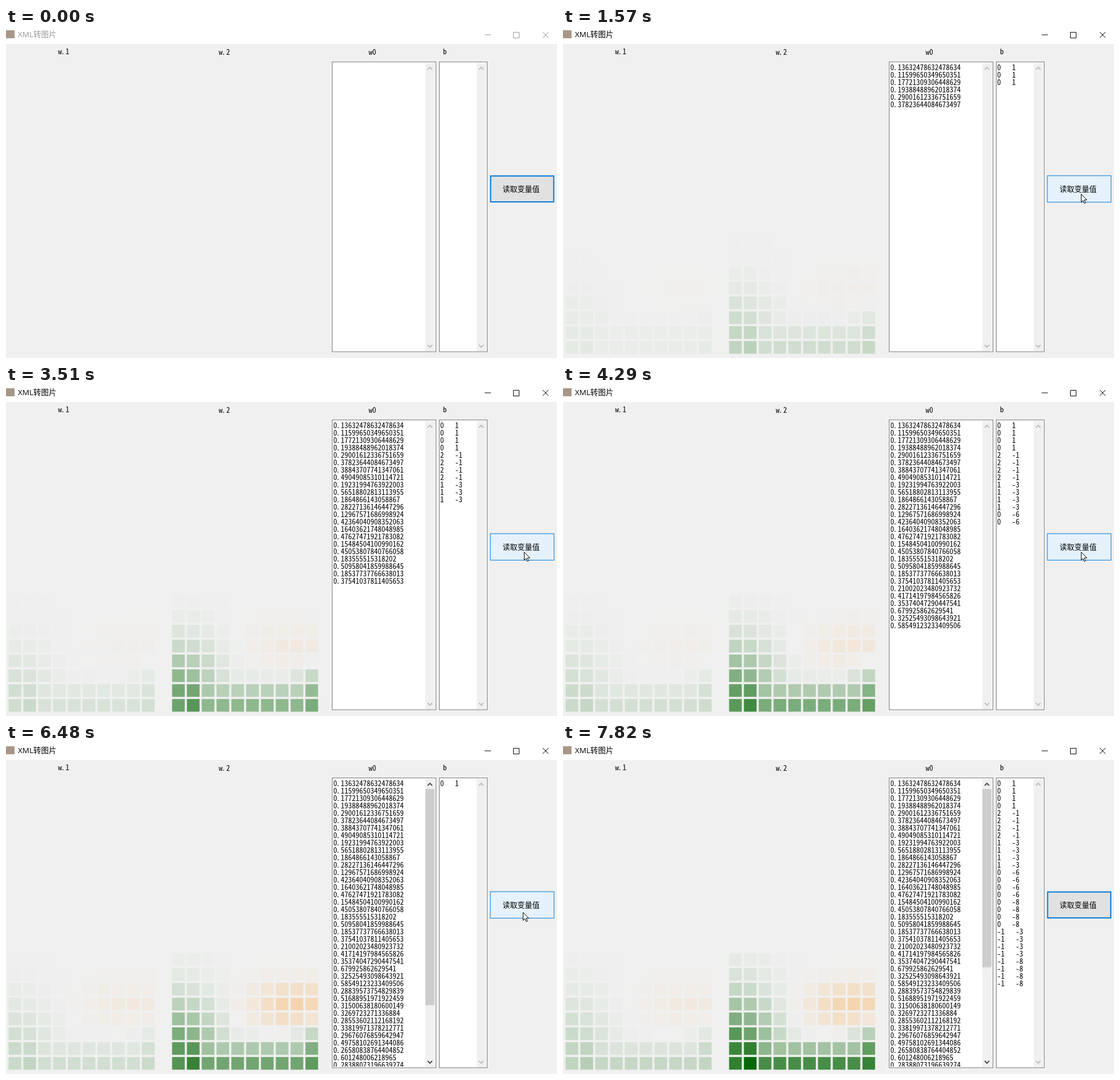
Recreate the animation shown at these times as an HTML page. Size 967x579 px, loop 8 s.

```html
<!DOCTYPE html>
<html lang="zh-CN">
<head>
<meta charset="utf-8">
<title>XML转图片</title>
<style>
html, body { margin: 0; width: 100%; height: 100%; overflow: hidden; background: #f0f0f0; }
svg { display: block; width: 967px; height: 579px; }
text { font: 13px "Noto Sans Mono CJK SC", "Noto Sans CJK SC", "Noto Sans CJK", "Liberation Mono", monospace; white-space: pre; }
#title { font: 13.5px "Open Sans", "Noto Sans CJK SC", "Noto Sans CJK", sans-serif; }
.line { fill: none; }
</style>
</head>
<body>
<svg id="stage" viewBox="0 0 967 579" xmlns="http://www.w3.org/2000/svg">
  <rect width="967" height="579" fill="#f0f0f0"/>
  <rect width="967" height="28" fill="#fff"/>
  <rect x="0" y="4" width="15" height="14" fill="#a89788"/>
  <text id="title" x="21" y="16">XML转图片</text>
  <path id="controls" class="line" d="M840 12h11M890.5 7.5h10v10h-10zM942 7l10 10m0-10l-10 10"/>
  <g id="cells"></g>
  <g id="labels"></g>
  <g id="boxes"></g>
  <clipPath id="clip"><rect x="573" y="60" width="270" height="506"/></clipPath>
  <g id="rows" clip-path="url(#clip)"></g>
  <rect id="button"/>
  <text x="904" y="287" text-anchor="middle">读取变量值</text>
  <path id="cursor" d="M.5.5v14l3.2-3 2.3 5.2 2.2-1-2.3-5h4.5z" fill="#fff" stroke="#000"/>
</svg>
<script>
const LOOP = 8000, COLS = 10, ROWS = 8, STEPS = 28;
const $ = id => document.getElementById(id);

function set(el, attrs) {
  for (const k in attrs) el.setAttribute(k, attrs[k]);
}
function add(parent, tag, attrs, text) {
  const el = document.createElementNS("http://www.w3.org/2000/svg", tag);
  set(el, attrs);
  if (text !== undefined) el.textContent = text;
  return parent.appendChild(el);
}
function show(el, on) { el.style.display = on ? "" : "none"; }

const mix = (a, b, p) => a + (b - a) * p;
const bell = (d, width) => Math.exp(-((d / width) ** 2));

// Piecewise linear curve through [x, y] points.
function curve(points, x) {
  const i = points.findIndex(p => x <= p[0]);
  if (i < 0) return points[points.length - 1][1];
  if (i === 0) return points[0][1];
  const [x0, y0] = points[i - 1], [x1, y1] = points[i];
  return mix(y0, y1, (x - x0) / (x1 - x0));
}

// Green comes from the left, bottom and right edges; orange from a patch at the right.
const learning = [[7, 0], [11, .25], [18, .75], [23, .55], [27, 1]];
function weight(r, c, step) {
  const p = curve(learning, step);
  const left = mix(.46, .8, p) * bell(r, mix(3.4, 4.1, p)) * bell(c, 2.6);
  const ridge = mix(.52, .98, p) * bell(r, 2.2) * bell(c - 1, .7);
  const bottom = mix(.31, .7, p) * bell(r, mix(1.4, 1.15, p));
  const right = mix(.4, .77, p) * bell(r, 2) * bell(9 - c, 1.2);
  const late = Math.min(1, Math.max(0, (step - 7) / 16));
  const orange = mix(.06, .28, late * late) * bell(c - 8, 3) * bell(r - 3.9, 1.5);
  return Math.min(1, step / 7) * (Math.max(left, ridge, bottom, right) - orange);
}

// Text shown in the two boxes
const values = `13632478632478634 11599650349650351 17721309306448629 19388488962018374
29001612336751659 37823644084673497 38843707741347061 49049085310114721
19231994763922003 56518802813113955 1864866143058867 28227136146447296
12967571686998924 42364040908352063 16403621748048985 47627471921783082
15484504100990162 45053807840766058 183555515318202 50958041859988645
18537737766638013 37541037811405653 21002023480923732 41714197984565826
35374047290447541 679925862629541 32525493098643921 58549123233409506
28839573754829839 51688951971922459 31500638180600149 3269723271336884
28553602112168192 33819971378212771 29676076859642947 49758102691344086
26580838764404852 601248006218965 28388073196639274`.split(/\s+/).map(d => "0." + d);
const biases = ["0   1", "2   -1", "1   -3", "0   -6", "0   -8", "-1   -3", "-1   -8"];

const dot = "0 -1.5 1.5";
add($("labels"), "text", { x: 91.5, y: 46, dx: dot }, "w.1");
add($("labels"), "text", { x: 373.5, y: 47, dx: dot }, "w.2");
add($("labels"), "text", { x: 636.5, y: 47 }, "w0");
add($("labels"), "text", { x: 767, y: 46 }, "b");

function textBox(x, w) {
  const g = $("boxes"), gutter = x + w - 19;
  add(g, "rect", { x: x + .5, y: 59.5, width: w - 1, height: 508.5, fill: "#fff", stroke: "#7a7a7a" });
  add(g, "rect", { x: gutter, y: 61, width: 17, height: 506, fill: "#f0f0f0" });
  const thumb = add(g, "rect", { x: gutter, y: 79, width: 16, height: 0, fill: "#cdcdcd" });
  const arrows = add(g, "path", {
    class: "line", stroke: "#bfbfbf", "stroke-width": 2,
    d: `M${gutter + 4} 73l4-4 4 4M${gutter + 4} 556l4 4 4-4`
  });
  return { thumb, arrows };
}
const valueBox = textBox(572, 183);
textBox(760, 85);

const addRow = (x, i, text, attrs) => add($("rows"), "text", { x, y: 73.7 + 13 * i, ...attrs }, text);
const valueRows = values.map((s, i) => addRow(574.5, i, s, { dx: dot }));
const biasRows = Array.from({ length: STEPS }, (_, i) => addRow(762, i, biases[i >> 2]));

// The first panel holds the same pattern as the second, only fainter.
const cells = [];
for (const [x, scale] of [[4.5, .25], [291.5, 1]])
  for (let r = 0; r < ROWS; r++)
    for (let c = 0; c < COLS; c++) {
      const el = add($("cells"), "rect", { x: x + 26 * c, y: 549.2 - 26 * r, width: 22.2, height: 22.2 });
      cells.push({ el, scale, r, c });
    }

// Training steps come at a steady beat with a short pause after some of them.
const pauses = [7, 13, 18, 23];
const stepTime = n => 1097 + 232 * (n - 1) + 88 * pauses.filter(p => n > p).length;
function stepAt(t) {
  let n = 0;
  while (n < STEPS && t >= stepTime(n + 1)) n++;
  return n;
}

let lastStep = -1;
function drawStep(step) {
  if (step === lastStep) return;
  lastStep = step;
  for (const { el, scale, r, c } of cells) {
    const v = scale * weight(r, c, step);
    set(el, { fill: v < 0 ? "#ff8c00" : "#006400", "fill-opacity": Math.abs(v).toFixed(3) });
  }
  valueRows.forEach((el, i) => show(el, i < step * 2));
  const lines = step * 2 + 1, scroll = lines > 38;
  set(valueBox.thumb, { height: scroll ? 469 * 38 / lines : 0 });
  set(valueBox.arrows, { stroke: scroll ? "#505050" : "#bfbfbf" });
}

// The pointer glides in, rests on the button, then leaves to the right.
function pointer(t) {
  const enter = 1 - (1 - Math.min(1, Math.max(0, (t - 90) / 500))) ** 1.5;
  const nudge = Math.min(1, Math.max(0, (t - 6400) / 80));
  const leave = Math.max(0, (t - 6600) / 700);
  return {
    x: mix(930, 909, enter) - 2 * nudge + 62 * leave,
    y: mix(521, 291, enter) + 4 * nudge + 22 * leave
  };
}

function draw(t) {
  const step = stepAt(t);
  drawStep(step);

  // The bias list is briefly caught while being rewritten.
  const rewriting = t >= stepTime(23) && t < stepTime(23) + 100;
  const count = rewriting ? 1 : step === STEPS && t < stepTime(STEPS) + 100 ? STEPS - 1 : step;
  biasRows.forEach((el, i) => show(el, i < count));

  const ink = t < 600 ? "#999" : "#000";
  set($("title"), { fill: ink });
  set($("controls"), { stroke: ink });

  const { x, y } = pointer(t);
  show($("cursor"), t >= 90 && x < 967);
  set($("cursor"), { transform: `translate(${Math.round(x)} ${Math.round(y)})` });

  const over = x >= 850 && x < 962 && y >= 259 && y < 306;
  const pressed = t >= 600 && t < 690;
  const edge = over ? 1 : 2;
  set($("button"), {
    x: 849.5 + edge / 2, y: 258.6 + edge / 2, width: 112.8 - edge, height: 47.5 - edge,
    fill: pressed ? "#cce4f7" : over ? "#e5f1fb" : "#e1e1e1",
    stroke: pressed ? "#005499" : "#0078d7", "stroke-width": edge
  });
}

const start = performance.now();
function tick() {
  draw((performance.now() - start) % LOOP);
  requestAnimationFrame(tick);
}
tick();
</script>
</body>
</html>
```
